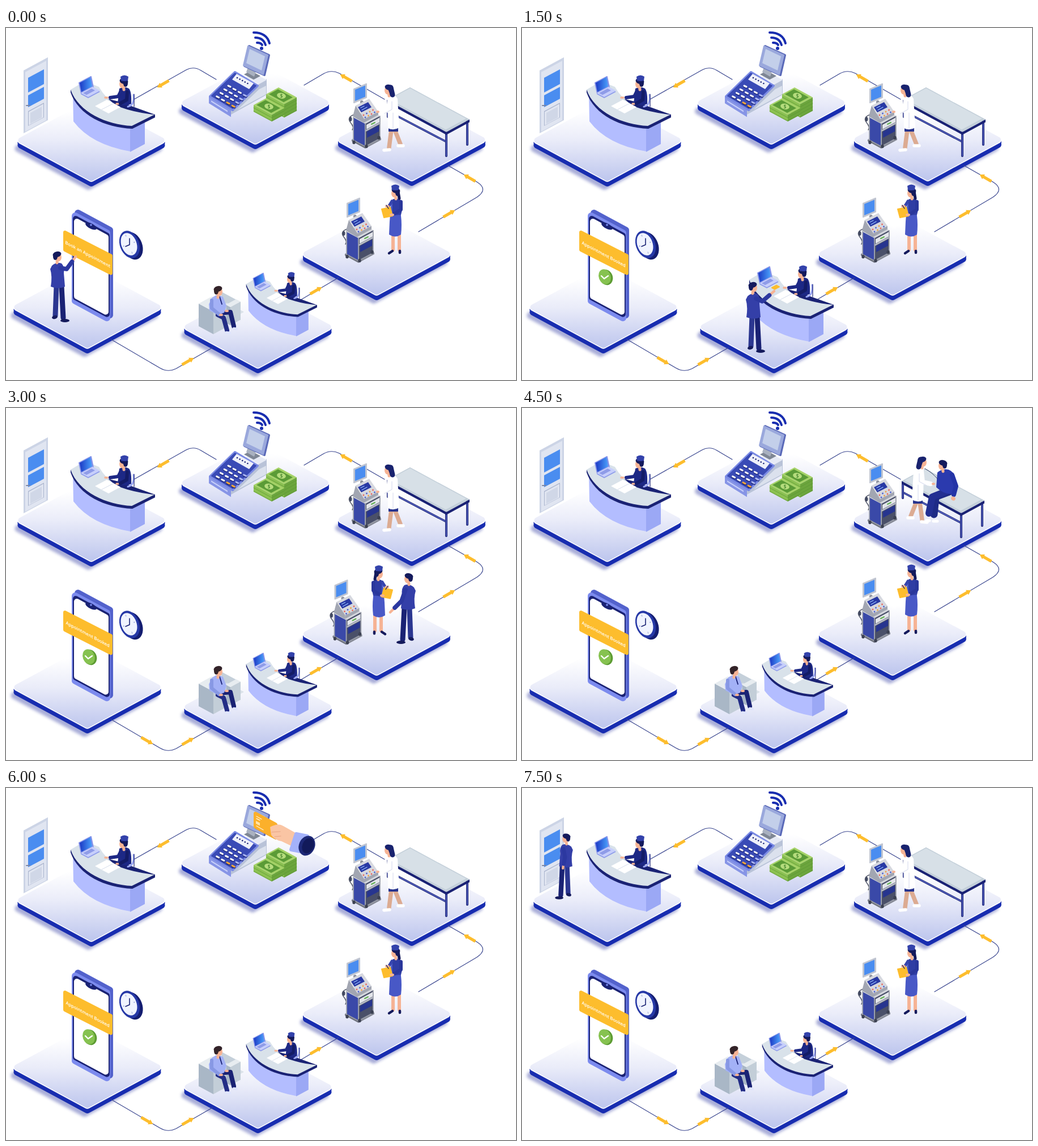
An HTML page for the animation above (9000 ms loop, 900 px wide and 622 px high).

```html
<!DOCTYPE html>
<html lang="en">
<head>
<meta charset="utf-8">
<title>Clinic visit</title>
<style>
html, body { margin: 0; width: 100%; height: 100%; overflow: hidden; background: #fff; }
svg { display: block; width: 100vw; height: 100vh; }
text { font-family: "Open Sans", "Noto Sans", sans-serif; font-weight: 600; fill: #fff; text-anchor: middle; }
</style>
</head>
<body>
<svg viewBox="0 0 900 622" xmlns="http://www.w3.org/2000/svg">
<defs>
<linearGradient id="floor" x1="0" y1="0" x2="0" y2="1">
<stop offset=".12" stop-color="#fff"/><stop offset=".5" stop-color="#eaecf9"/><stop offset="1" stop-color="#c0c8ee"/>
</linearGradient>
<linearGradient id="lcd" x1="0" y1="0" x2="1" y2="0">
<stop offset="0" stop-color="#1b39c4"/><stop offset="1" stop-color="#4aa0fb"/>
</linearGradient>
<filter id="soft" x="-20%" y="-20%" width="140%" height="140%"><feGaussianBlur stdDeviation="2.8"/></filter>
</defs>
<g id="stage"></g>
</svg>
<script>
const NAVY = '#1a2274', INK = '#141a5c', BLUE = '#343fa8', ROYAL = '#182db0', LAV = '#b3bdff',
  SKIN = '#f6b394', GOLD = '#fdbd2d', WHITE = '#fff', GLASS = '#4a8df0', STEEL = '#8f939f';
const K = .54; // slope of the isometric axes

const p = (fill, d, more = '') => `<path fill="${fill}" d="${d}" ${more}/>`;
const line = (color, w, d) =>
  p('none', d, `stroke="${color}" stroke-width="${w}" stroke-linecap="round" stroke-linejoin="round"`);
const oval = (fill, x, y, rx, ry = rx, turn = 0) =>
  `<ellipse fill="${fill}" cx="${x}" cy="${y}" rx="${rx}" ry="${ry}" transform="rotate(${turn} ${x} ${y})"/>`;
const at = (transform, ...kids) => `<g transform="${transform}">${kids.join('')}</g>`;
const loop = (n, f) => Array.from({ length: n }, (_, i) => f(i)).join('');
const grid = (rows, cols, f) => loop(rows * cols, i => f(Math.floor(i / cols), i % cols));

// A parallelogram from a corner and two edges; r rounds it outwards.
const quad = (fill, x, y, ax, ay, bx, by, r = 0) => p(fill, `M${x},${y}l${ax},${ay} ${bx},${by} ${-ax},${-ay}z`,
  r ? `stroke="${fill}" stroke-width="${2 * r}" stroke-linejoin="round"` : '');
const wall = (fill, x, y, w, h, k = K, r = 0) => quad(fill, x, y, w, w * k, 0, h, r);
const tile = (fill, x, y, a, b, r = 0) => quad(fill, x, y, a, a * K, b, -b * K, r);
const box = ([top, left, right], x, y, a, b, h) =>
  wall(left, x, y, a, h) + wall(right, x + a, y + a * K, b, h, -K) + tile(top, x, y, a, b);

const slab = (fill, y, r = 6) => tile(fill, -124, y, 124, 124, r);
const platform = (x, y) => at(`translate(${x} ${y})`,
  `<g opacity=".7" filter="url(#soft)" transform="translate(-5 0)">${slab('#858bc8', 14)}</g>`,
  slab(ROYAL, 8), slab(ROYAL, 4), slab(WHITE, 0), slab('url(#floor)', -.6, 5));

const arrow = (x, y, turn) => at(`translate(${x} ${y}) rotate(${turn})`,
  p(GOLD, 'M-12,-2.6H4V-4.8L12,0 4,4.8V2.6H-12Z'));

const route = line('#3a468f', 1.2,
  'M226,126L318,74Q331,67 344,75L371,91M526,101L560,81Q574,73 588,80L668,126' +
  'M780,243L831,272Q852,285 831,299L728,360M587,441L519,481M185,550L272,601Q286,609 300,602L364,565');

// Faces look right when dir is 1, left when it is -1.
const head = (x, y, dir, hair = INK) =>
  line(SKIN, 5, `M${x},${y}l${-dir},11`) + oval(SKIN, x + dir * 1.5, y + 1, 5.5, 7.5) +
  oval(hair, x - dir, y - 4, 7.6, 5, dir * -15) + oval(hair, x - dir * 4, y, 4, 6);
const cap = (x, y) => p('#3342ab', `M${x - 7},${y - 3}q7,-5 14,0l-1,7q-6,2 -12,0z`);

const door = wall('#ccd4e6', 31, 75, 43, 111, -K) + wall('#e0e5f1', 34, 78, 37, 105, -K) +
  wall(GLASS, 39, 88, 28, 26, -K) + wall(GLASS, 39, 119, 28, 21, -K) +
  wall('#aab4cd', 39, 147, 28, 26, -K) + wall('#e0e5f1', 40, 148, 26, 24, -K) +
  wall('#d0d7e7', 43, 150, 20, 19, -K) + line('#7d87a3', 2, 'M36,137h6');

const laptop = quad('#8592ea', 133, 116, 21, -11, -4, -19, 1) + quad('url(#lcd)', 133, 113, 19, -10, -3, -16) +
  tile('#8f9cea', 132, 117, 13, 21) + tile('#c7cffb', 132, 115, 13, 21) + tile('#8f9ce8', 136, 115, 6, 15);

const clerk = line('#98a5f5', 3, 'M215,139Q227,137 225,118') + line(NAVY, 1.2, 'M226,139V117') +
  p('#1d2885', 'M200,107Q209,102 217,107Q222,113 221,134Q210,140 197,133Z') +
  line('#1d2885', 6, 'M203,111L198,121 184,123') + line(SKIN, 3.5, 'M175,123h4M195,134h3') +
  line('#141c66', 6, 'M214,113L213,127 202,133') + head(207, 98, -1) + cap(209, 89);

const desk =
  p(LAV, 'M118,116Q150,170 219,175V218Q150,206 119,165Z') + wall('#9ba8f5', 219, 177, 26, 42, -K) +
  p(NAVY, 'M114,109 199,130 263,153V158L223,178C174,176 128,154 114,114Z') +
  p('#d9e2ea', 'M114,109 139,94 164,104Q176,126 199,139Q229,150 262,153L222,173C178,171 128,149 114,109Z') +
  laptop + clerk + tile(WHITE, 157, 138, 24, 21) +
  line('#ccd5e6', .8, 'M169,144l21,-11');

const keyColor = (r, c) => r === 3 && c > 1 ? '#f4a73a' : c === 3 ? '#aab5f2' : WHITE;
const register =
  p('#b9c3d8', 'M397,145 446,99 460,90V118L397,153Z') + p('#dbe1ed', 'M409,144 447,108 459,102V117Z') +
  tile('#e6eaf5', 423, 87, 23, 14) + tile('#7e8694', 420, 82, 17, 12) + quad('#a9b1c0', 428, 66, 14, 8, -4, 12) +
  quad('#5a69b8', 429, 32, 35, 16, -8, 35, 2) + quad('#9aa8dc', 427, 32, 35, 16, -8, 34, 1) +
  quad('#c3cfea', 430, 37, 27, 13, -6, 25) +
  wall('#8795e6', 358, 121, 39, 12, .62) + wall('#c7cffa', 362, 128, 29, 2.5, .62) +
  quad('#7a8ae4', 360, 121, 44, -43, 40, 24, 2) + quad('#3a4bb6', 363, 120, 41, -40, 37, 22, 1) +
  quad('#eef0fa', 399, 91, 8, -10, 30, 17) + loop(5, i => oval(NAVY, 408 + i * 4.6, 88 + i * 2.5, 1.3)) +
  grid(4, 4, (r, c) => {
    const x = 392 + c * 9.2 - r * 6.8, y = 102 + c * 5.4 + r * 6.3;
    return line(NAVY, 4, `M${x},${y + 1}l4,2`) + line(keyColor(r, c), 3.1, `M${x},${y}l4,2`);
  });

const wifi = oval(ROYAL, 451, 36, 3) +
  line(ROYAL, 4, 'M437,8Q460,8 465,27M440,17Q454,17 458,30M443,26Q450,26 452,30');

const bills = (x, y, h) => at(`translate(${x} ${y})`,
  box(['#a5d268', '#8cc152', '#6ca53d'], 0, 0, 32, 22, h),
  loop(h / 6, i => line('#5a9434', .7, `M0,${i * 6 + 5}l32,${32 * K} 22,${-22 * K}`)),
  tile('#5b9b37', 5, 0, 26, 16), oval('#b5dc7d', 27, 2.7, 8, 5, 12),
  `<text x="27" y="5.6" style="font-size:8px;fill:#3c7d26">$</text>`);

const cart =
  line('#565b6c', 1.6, 'M614,153Q601,158 608,167T611,180') + oval('#444b62', 608, 161, 2.5, 4) +
  wall('#c0c5d1', 614, 108, 22, 24, -.42, 1) + wall(GLASS, 616, 109, 18, 20, -.42) +
  line(STEEL, 6, 'M628,131l1,6') +
  box([STEEL, '#70747f', '#858995'], 610, 197, 24, 28, 3) +
  box(['#d4d6dc', '#3a49a8', '#4a5069'], 613, 158, 21, 26, 39) +
  wall('#e3e5ea', 636, 171, 23, 8, -K) + line('#61b050', 2, 'M645,170l6,-3') +
  wall('#27358f', 637, 183, 21, 11, -K) + wall('#b9bdc8', 635, 180, 25, 3, -K) +
  line('#a4a8b2', 1.8, 'M613,158v39M634,169v39M660,156v38') +
  p('#a2a6b2', 'M617,137L632,161V168L612,156Z') + wall('#a2a6b2', 632, 161, 25, 6, -K) +
  quad('#d6d8df', 617, 137, 24, -12, 16, 23) + quad('#2839a5', 621, 140, 18, -9, 6, 9) +
  line('#9bc5ff', 1.2, 'M626,141l6,-3M628,145l9,-5') +
  grid(2, 4, (r, c) => oval(['#e7695d', '#4b61d0', '#f0a142'][(c + r) % 3],
    631 + c * 5.5 + r * 3, 154 - c * 3 + r * 4, 1.4)) +
  loop(3, i => oval('#3c4152', 614 + i * 22, 202 + [0, 7, -8][i], 2.7, 3.2));

const phone =
  wall('#5362cc', 127, 327, 56, 150, K, 6) + wall('#7c8bee', 122, 332, 56, 150, K, 6) +
  wall(NAVY, 123, 337, 55, 139, K, 5) + wall(WHITE, 125, 342, 51, 132, K, 5) +
  oval(NAVY, 150, 350, 11, 4.5, 28) + oval('#7f91f5', 150, 348, 1.8);

const banner = words => wall(GOLD, 104, 361, 81, 31, .51, 3) +
  `<text transform="matrix(.95 .51 -.08 1 144 402.5)" font-size="7.9">${words}</text>`;

const tick = oval('#5d9c33', 148.5, 440.5, 11.5, 14, -20) + oval('#86c250', 146, 439.5, 10.5, 13.5, -20) +
  line(WHITE, 2.4, 'M140,438l5,5 7,-5');

const clock = oval('#141d70', 223.5, 385, 17, 25, -20) + oval('#2638a6', 218, 382.5, 17, 25, -20) +
  oval('#f0f3ff', 217, 382, 13.5, 20.5, -20) +
  at('translate(217 382) rotate(-20) scale(.62 1)',
    loop(4, i => at(`rotate(${i * 90})`, line('#98a2d4', 1.6, 'M0,-17v2')))) +
  line(NAVY, 1.6, 'M218,372v11l-7,3');

// Stands on 0,0 facing right; the arm runs from the shoulder over the elbow to the hand.
const man = (elbowX, elbowY, handX, handY) =>
  line('#2b3690', 9, 'M-6,-62L-8,-10') + line(NAVY, 9, 'M3,-62L6,-6') +
  oval(INK, -9, -7, 5, 3, -15) + oval(INK, 9, -1, 8, 3) +
  p(BLUE, 'M-14,-98Q-6,-105 3,-102Q9,-96 7,-85L9,-61Q-3,-56 -16,-61Q-13,-80 -17,-92Z') +
  head(-4, -114, 1) +
  line(SKIN, 4.5, `M${handX},${handY}L${elbowX},${elbowY}`) +
  line('#2c38a0', 7.5, `M1,-94L${elbowX},${elbowY} ${elbowX + (handX - elbowX) * .6},${elbowY + (handY - elbowY) * .6}`);

const booker = at('translate(95 518)', man(12, -92, 28, -114));
const payer = at('translate(412 572)', man(12, -89, 33, -107)) + tile(GOLD, 441, 459, 5, 8, 1);
const guest = at('matrix(-1 0 0 1 706 415)', man(8, -74, 28, -54));
const leaver = at('matrix(-.93 0 0 .93 74 195)', man(-2, -78, 2, -57));

const CHAIR = ['#e7ecf0', '#a9b7c6', '#c3ced8'];
const waiting =
  wall('#c5d0da', 380, 466, 34, 32) + tile('#dbe2e9', 354, 505, 30, 36) +
  box(CHAIR, 388, 489, 8, 18, 32) + box(CHAIR, 340, 487, 26, 23, 40) +
  line(NAVY, 8, 'M376,504L396,502 402,527') + line('#232d85', 8, 'M374,507L384,512 390,534') +
  line('#dfe4fc', 4.5, 'M389,538l6,1M402,531l5,1') +
  p('#a3b1f6', 'M364,476 373,471 383,475 389,491 385,503 374,507 359,499 358,488Z') +
  line('#8798e4', 6, 'M363,481V495L376,506') + line(NAVY, 1.8, 'M377,475l4,13') +
  line(SKIN, 4, 'M378,507h3M388,500h3') + head(375, 465, 1, '#332329');

const nurse =
  line(SKIN, 6, 'M683,362V392M694,362V392') + line(INK, 4.5, 'M676,398l6,-4M695,397v-3') +
  p('#4858c6', 'M680,305 696,304 697,332Q699,348 697,365Q687,372 676,365L677,342Z') +
  p('#2f3da4', 'M682,303Q690,299 697,304Q701,317 697,330L682,331Z') +
  line('#3544ae', 5, 'M681,306l-5,8') + line(SKIN, 4, 'M671,315h4') +
  quad(GOLD, 663, 320, 15, -3, 4, 15, 1) + line(INK, 1.3, 'M671,313l4,6') +
  line('#2a379b', 6, 'M697,307V321L686,328') + oval(SKIN, 681, 330, 4, 2.3) +
  line(INK, 5, 'M692,289L694,301') + head(687, 291, -1) + cap(687, 282);

const bed = line(NAVY, 3.5, 'M674,147L777,201') + line('#6e7ee2', 1.2, 'M674,147L777,201') +
  loop(3, i => {
    const leg = `M${[674, 777, 814][i]},${[129, 184, 164][i]}v${i ? 42 : 28}`;
    return line(NAVY, 4, leg) + line('#6e7ee2', 1.2, leg);
  }) + box(['#c3cfd9', NAVY, NAVY], 672, 127, 105, 41, 5) + tile('#d7e0e7', 677, 126, 99, 36);

const doctor =
  line('#dcab92', 7.5, 'M680,180L676,211M686,180L696,205') + line(WHITE, 5.5, 'M667,216l10,-1M692,208l9,0') +
  quad('#27348f', 675, 174, 17, 0, 0, 9) +
  p(WHITE, 'M673,122Q685,114 691,125L694,176Q684,182 674,177Z') +
  line(WHITE, 8, 'M677,125L675,145 661,148') + line('#d3d8ed', 1, 'M681,130V144L668,151M683,150V177') +
  oval(SKIN, 656, 148, 3, 2) + head(675, 109, -1, '#18226e') + line('#18226e', 9, 'M679,105L682,118');

const patient =
  line('#1e2a86', 13, 'M754,148L730,157 727,188') + line('#232f92', 12, 'M749,147L724,157 718,186') +
  line(WHITE, 5, 'M714,199h5M726,200h7') +
  p('#2b3aae', 'M733,114Q742,106 753,109Q765,114 765,130L763,152Q745,154 731,140Z') +
  line('#2434a6', 8, 'M759,118L766,138 762,153') + oval(SKIN, 761, 160, 4, 3.5, 30) + head(742, 101, -1);
const exam = patient + at('matrix(-1 0 0 1 1382 -14)', doctor) + line('#344062', 1, 'M711,107Q724,114 733,125');

const payHand =
  wall('#df8d18', 441, 46, 35, 23, K, 3) + wall('#fbb02b', 440, 45, 35, 23, K, 3) +
  line('#fff1cf', 1.4, 'M442,50l9,5M442,54l6,3M442,67l12,7') + wall('#ffe4a6', 441, 58, 7, 5) +
  p('#fac5a4', 'M466,69Q481,61 489,67L512,80 507,104 486,94Q474,92 468,83Z') +
  line('#e8a585', 1, 'M469,78l15,-1M474,86l11,-1') +
  quad('#a4b2fa', 512, 81, 20, 4, -9, 28, 3) + oval('#1d2876', 531, 102, 14, 18, 22) + oval('#121a5a', 533, 102, 10, 14, 22);

const slabs = [[150.5, 199], [440, 133], [716, 198], [654, 400], [444.5, 529], [143.5, 494]]
  .map(c => platform(...c)).join('');
const arrows = [[277, 99, 150], [600, 88, 210], [818, 265, 210], [782, 328, -30], [547, 464, -30], [321, 589, -30]]
  .map(a => arrow(...a)).join('');

// Steps: 0 book, 1 check in, 2 meet the nurse, 3 exam, 4 pay, 5 leave.
function scene(step) {
  const is = (n, yes, no = '') => step === n ? yes : no;
  return slabs + route + arrows + is(0, '', arrow(249, 588, 30)) +
    door + is(5, leaver) + desk +
    register + wifi + bills(459, 117, 24) + bills(437, 136, 12) + is(4, payHand) +
    is(3, at('translate(-2 2)', bed), bed) + cart + is(3, exam, doctor) +
    is(2, at('translate(-33.5 205.5)', cart) + at('matrix(-1 0 0 1 1345 1.5)', nurse) + guest,
      at('translate(-12 202)', cart) + nurse) +
    is(1, at('translate(287 336)', desk) + payer,
      waiting + at('translate(328 361) scale(.84)', desk)) +
    phone + banner(is(0, 'Book an Appointment', 'Appointment Booked')) +
    is(0, booker, tick) + clock;
}

const stage = document.getElementById('stage'), start = performance.now();
let shown = -1;
function update() {
  const step = Math.floor((performance.now() - start) % 9000 / 1500);
  if (step !== shown) stage.innerHTML = scene(shown = step);
  requestAnimationFrame(update);
}
update();
</script>
</body>
</html>
```
